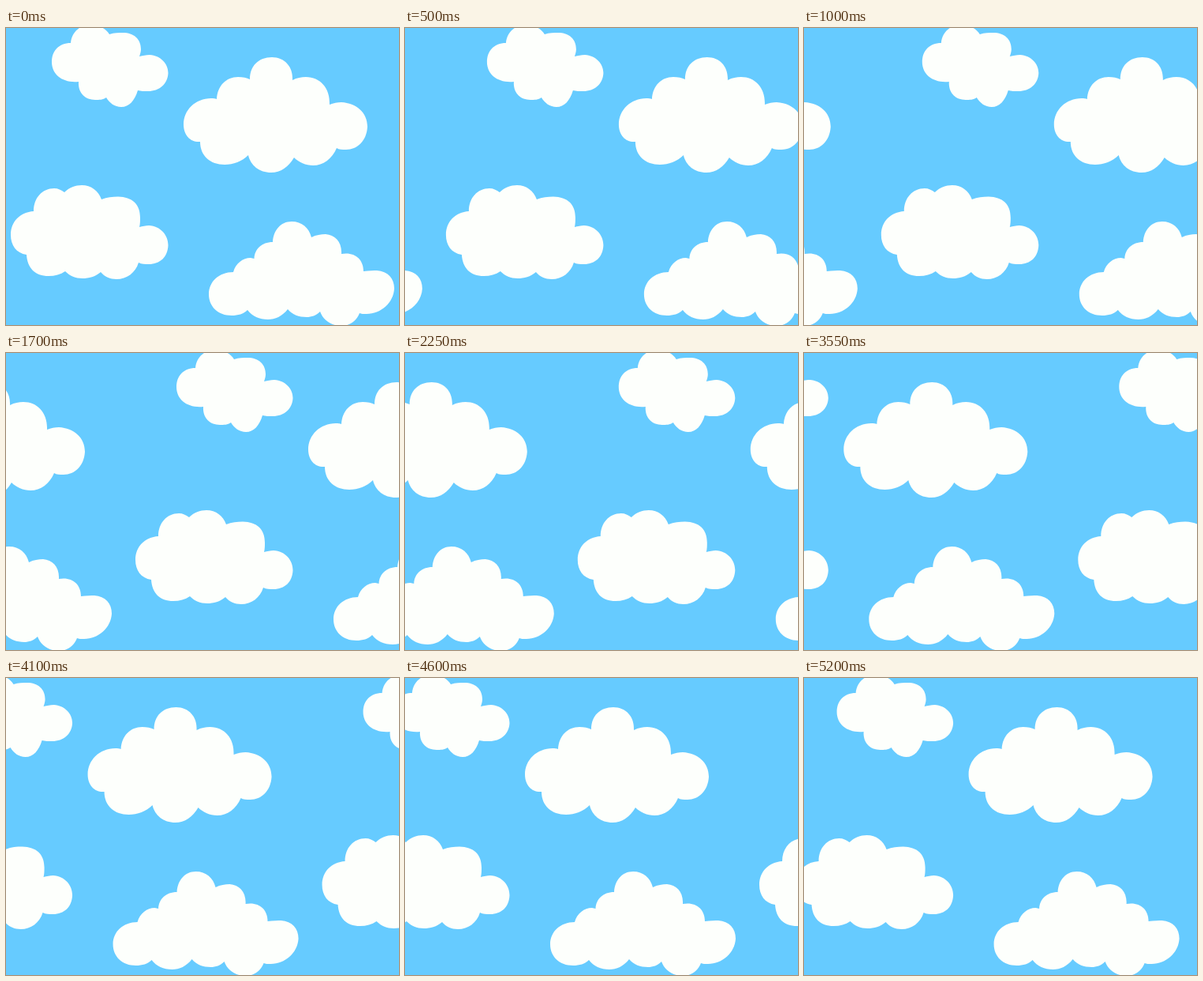
These frames come from a looping animation (498 px wide and 376 px high, 5.25 s). An HTML page:

```html
<!DOCTYPE html>
<html lang="en">
<head>
<meta charset="utf-8">
<title>Drifting clouds</title>
<style>
  html, body { margin: 0; width: 100%; height: 100%; overflow: hidden; background: #66cbff; }
  svg { display: block; width: 100vw; height: 100vh; }
</style>
</head>
<body>
<svg viewBox="0 0 498 376" preserveAspectRatio="none">
  <rect width="498" height="376" fill="#66cbff"/>
  <g id="sky" fill="#fdfffc">
    <g id="clouds">
      <path d="M82 19C83 6 93 -4 107 -4C117 -4 126 0 131 8C137 6 143 6 148 6C162 6 171 14 171 27
        C171 30 170 33 169 36C174 35 177 34 182 34C196 35 205.5 45 205.5 57C205 71 194 80 180 80
        C175 80 171 80 167 79C163 92 156 100 146 100C138 100 131 95 127 88C123 91 118 91 113 91
        C100 91 91 82 92 68C72 70 58 59 58 43C58 29 67 19 82 19Z"/>
      <path d="M267 90C268 73 279 62 294 62C300 62 305 63 309 65C309 48 320 37 337 37
        C353 37 364 49 363 66C369 63 374 62 380 62C398 62 411 76 410 97C415 95 420 94 425 94
        C444 95 458 107 458 125C457 143 445 154 431 154C426 154 422 154 419 152
        C413 166 402 174 389 174C380 174 371 170 365 164C358 176 348 183 336 183
        C321 183 310 174 307 161C299 169 288 173 277 173C259 173 246 162 246 144
        C234 145 225 136 225 122C225 104 240 89 260 89C263 89 265 89 267 90Z"/>
      <path d="M35 232C35 215 46 203 61 203C66 203 70 205 74 208C80 202 88 199 96 199
        C108 199 117 206 121 217C128 214 135 213.5 142 213.5C160 214 170 223 170 240
        C170 244 170 248 169 252C173 251 177 250 181 250C196 251 205.5 262 205.5 275
        C205 290 195 299 181 299C176 299 172 299 168 297C164 310 153 318 140 318
        C132 318 125 315 120 309C113 315 105 317 97 317C88 317 81 314 75 308
        C69 312 62 314 54 314C37 314 27 304 26 287C13 285 6 275 6 262C6 245 18 233 35 232Z"/>
      <path d="M288 309C291 298 300 291 310 291L314.5 292C315 280 324 271 338 271
        C339 256 348 245 362 245C375 245 384 253 387 265C393 262 399 261 405 261
        C417 262 426 271 425 286C441 283 453 292 453 308C460 307 466 307 470 307
        C484 308 492 317 492 330C491 348 475 362 457 362C453 362 450 362 448 361
        C444 371 436 377 425 377C412 377 402 370 398 359C393 364 387 366 381 366
        C371 366 363 363 357 356C350 365 341 369 332 369C321 369 312 365 306 357
        C301 362 294 364 286 364C269 364 257 353 257 337C257 321 270 309 288 309Z"/>
    </g>
    <use href="#clouds" x="-516"/>
  </g>
</svg>
<script>
  const LOOP = 5250, STEP = 50;
  const sky = document.getElementById('sky');

  // [time in ms, drift in px]: the wind picks up slightly mid-loop
  const drift = [[0, 0], [1000, 91.8], [1700, 158], [2800, 267.6], [3550, 341.3], [4600, 443], [5200, 499.6]];

  function driftAt(time) {
    const next = Math.max(1, drift.findIndex(([t]) => t >= time));
    const [t0, x0] = drift[next - 1], [t1, x1] = drift[next];
    return x0 + (x1 - x0) * (time - t0) / (t1 - t0);
  }

  function render(now) {
    const time = Math.floor((now % LOOP) / STEP) * STEP;
    sky.setAttribute('transform', `translate(${driftAt(time).toFixed(2)} 0)`);
  }

  const start = performance.now();
  function tick() {
    render(performance.now() - start);
    requestAnimationFrame(tick);
  }
  tick();
</script>
</body>
</html>
```
